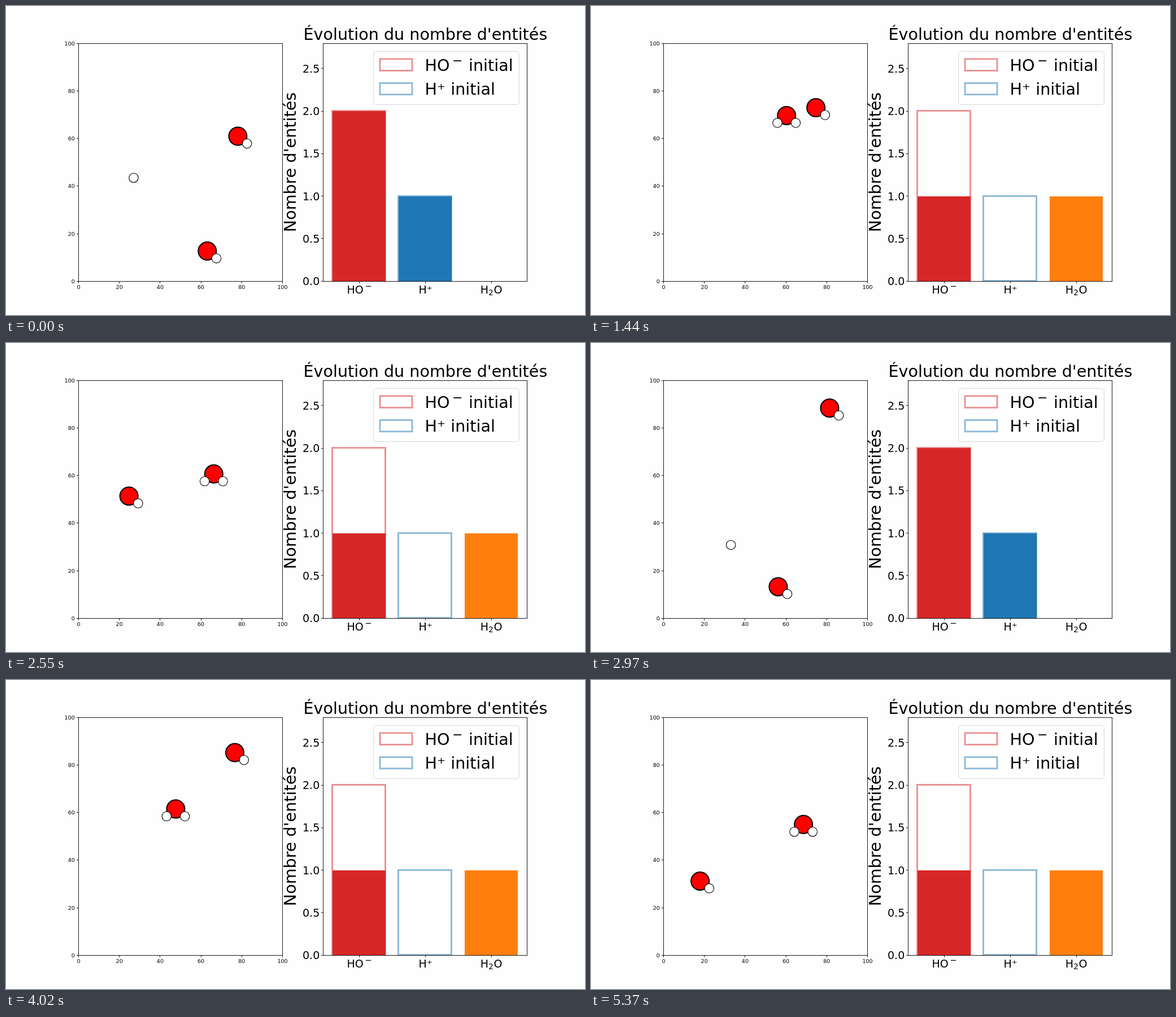
These frames come from a looping animation (1025x547 px, 5.4 s). An HTML page:

```html
<!DOCTYPE html>
<html lang="fr">
<head>
<meta charset="utf-8">
<title>Évolution du nombre d'entités</title>
<style>
  html, body { margin: 0; width: 100%; height: 100%; overflow: hidden; background: #fefefe; }
  svg { display: block; width: 1025px; height: 547px; font-family: "DejaVu Sans", sans-serif; }
  .small { font-size: 9.55px; }
  .mid { font-size: 19.1px; }
  .big { font-size: 28.6px; }
  .end { text-anchor: end; }
  .center { text-anchor: middle; }
  .axis { fill: none; stroke: #000; stroke-width: .9; }
  .outline { fill: none; stroke-width: 2.9; stroke-opacity: .5; }
  .red { stroke: #d62728; }
  .blue { stroke: #1f77b4; }
  .oxygen { fill: #f00; stroke: #000; stroke-width: 2; }
  .hydrogen { fill: #fff; stroke: #000; stroke-width: 1.1; }
</style>
</head>
<body>
<svg viewBox="0 0 1025 547">
  <defs>
    <circle id="oxygen" class="oxygen" r="16"/>
    <circle id="hydrogen" class="hydrogen" r="8.2"/>
  </defs>
  <g id="hydroxide"><use href="#oxygen"/><use href="#hydrogen" x="16.2" y="12.9"/></g>
  <g id="partner"><use href="#oxygen"/><use href="#hydrogen" x="16.2" y="12.9"/></g>
  <g id="proton"><use href="#hydrogen"/></g>
  <g id="water">
    <use href="#oxygen"/><use href="#hydrogen" x="-16.2" y="12.9"/><use href="#hydrogen" x="16.2" y="12.9"/>
  </g>

  <rect class="outline red" x="577.5" y="185.5" width="94" height="301"/>
  <rect class="outline blue" x="694.5" y="336.5" width="94" height="150"/>
  <g id="bars"><rect fill="#d62728"/><rect fill="#1f77b4"/><rect fill="#ff7f0e"/></g>

  <g id="axes">
    <rect class="axis" x="128.5" y="66.5" width="361" height="421"/>
    <rect class="axis" x="561.5" y="66.5" width="361" height="421"/>
  </g>

  <text class="big center" x="742.4" y="60.3">Évolution du nombre d'entités</text>
  <text class="big center" transform="translate(513 276.5) rotate(-90)">Nombre d'entités</text>

  <g class="mid">
    <text x="603.4" y="509">HO</text>
    <text class="center" x="641.5" y="501.4" font-size="14.8">−</text>
    <text class="center" x="742.6" y="509">H⁺</text>
    <text x="839.8" y="509">H<tspan dy="3" font-size="13.4">2</tspan><tspan dx=".8" dy="-3">O</tspan></text>
  </g>

  <rect x="650.8" y="80.5" width="257.6" height="94" rx="4.5" fill="#fff" fill-opacity=".8" stroke="#ccc" stroke-opacity=".8"/>
  <rect class="outline red" x="662" y="93.8" width="57" height="20.6"/>
  <rect class="outline blue" x="662" y="136.5" width="57" height="20.2"/>
  <g class="big">
    <text x="741.6" y="114.7">HO</text>
    <text class="center" x="799.3" y="104" font-size="22">−</text>
    <text x="819" y="114.7">initial</text>
    <text x="741.6" y="157.4">H⁺ initial</text>
  </g>
</svg>
<script>
const STEP = 30, CYCLE = 90, REACTION = 21;
const BASE = 487, UNIT = 150.5, BAR_LEFT = 578, BAR_WIDTH = 94, BAR_PITCH = 117.2;
const WALL = 10, ROOM = 80;

const $ = id => document.getElementById(id);
const px = v => 128.5 + 3.61 * v;
const py = v => 487.2 - 4.207 * v;
const snap = v => Math.floor(v) + .5;

function set(node, attrs) {
  for (const key in attrs) node.setAttribute(key, attrs[key]);
}

function add(tag, attrs, text = '') {
  const node = document.createElementNS('http://www.w3.org/2000/svg', tag);
  set(node, attrs);
  node.textContent = text;
  $('axes').append(node);
}
const xTick = x => add('path', { class: 'axis', d: `M${snap(x)} 487.5v3.5` });
const yTick = (x, y) => add('path', { class: 'axis', d: `M${x} ${snap(y)}h-3.5` });

for (let v = 0; v <= 100; v += 20) {
  xTick(px(v));
  yTick(128.5, py(v));
  add('text', { class: 'small center', x: px(v), y: 501 }, v);
  add('text', { class: 'small end', x: 121.8, y: py(v) + 3.5 }, v);
}
for (let v = 0; v <= 2.5; v += .5) {
  const y = BASE - UNIT * v;
  yTick(561.5, y);
  add('text', { class: 'mid end', x: 555.3, y: y + 7 }, v.toFixed(1));
}
const bars = [...$('bars').children];
bars.forEach((bar, i) => {
  const x = BAR_LEFT + BAR_PITCH * i;
  set(bar, { x: Math.round(x), width: BAR_WIDTH });
  xTick(x + BAR_WIDTH / 2);
});

// Straight drift between collisions, as [step, x, y] in a room unfolded
// at its walls; bounce() folds it back, which yields every rebound.
const drift = {
  hydroxide: [[0, 78.1, 61], [23, 86.6, 131], [48, 74.7, 267], [64, 112.9, 357.2], [85, 155.3, 448.6], [89, 162.1, 468.8]],
  water: [[23, 38.9, 18.6], [48, -40.3, 69.7], [64, -40.1, 100.4], [85, -46.3, 119.3], [89, -48.6, 125]],
  partner: [[0, 63.1, 12.7], [REACTION, 47, 14]],
  proton: [[0, 27, 43.5], [REACTION, 41, 14]]
};

function bounce(v) {
  const turn = 2 * ROOM;
  const d = ((v - WALL) % turn + turn) % turn;
  return WALL + Math.min(d, turn - d);
}

function place(id, step) {
  const legs = drift[id];
  const end = Math.max(1, legs.findIndex(leg => leg[0] >= step));
  const [s0, x0, y0] = legs[end - 1], [s1, x1, y1] = legs[end];
  const k = (step - s0) / (s1 - s0);
  const x = px(bounce(x0 + (x1 - x0) * k)), y = py(bounce(y0 + (y1 - y0) * k));
  set($(id), { transform: `translate(${x} ${y})` });
}

function draw(now) {
  const step = Math.floor(now / STEP) % CYCLE;
  const reacted = step >= REACTION;
  const visible = ['hydroxide', ...(reacted ? ['water'] : ['partner', 'proton'])];
  for (const id in drift) $(id).style.display = visible.includes(id) ? '' : 'none';
  for (const id of visible) place(id, step);

  const counts = reacted ? [1, 0, 1] : [2, 1, 0];
  counts.forEach((count, i) => {
    const y = Math.round(BASE - UNIT * count);
    set(bars[i], { y, height: BASE - y });
  });
}

let start;
function loop(now) {
  start ??= now;
  draw(now - start);
  requestAnimationFrame(loop);
}
draw(0);
requestAnimationFrame(loop);
</script>
</body>
</html>
```
